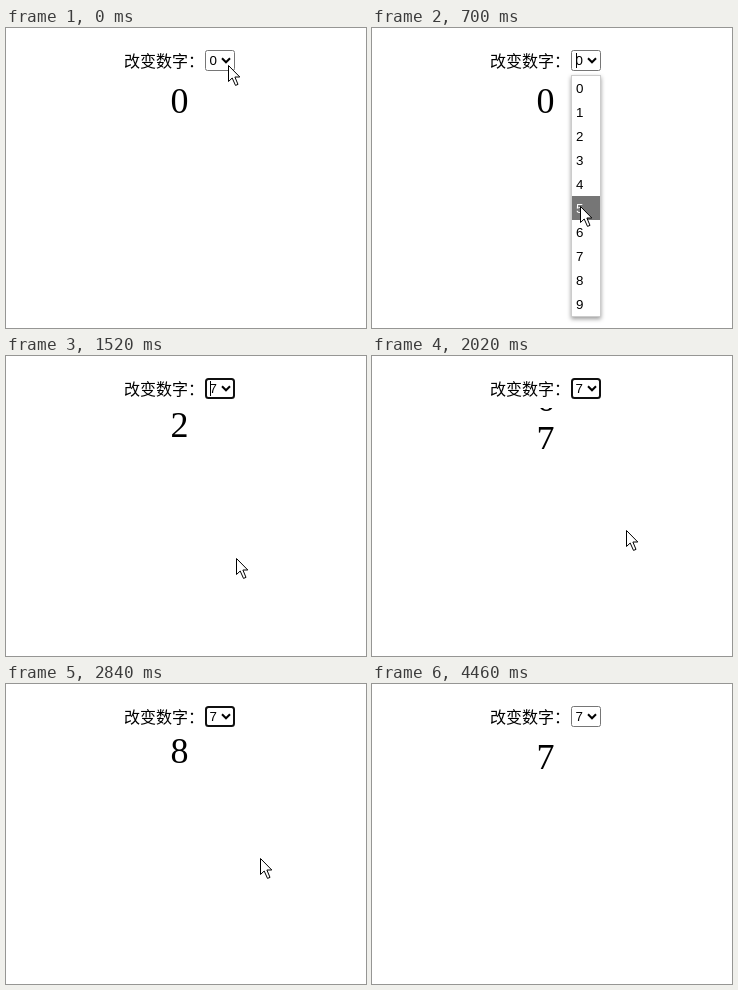
Animation of 360x300 px, one loop 4660 ms. Source, as an HTML page:

```html
<!DOCTYPE html>
<html lang="zh-CN">
<head>
<meta charset="utf-8">
<style>
  html, body { margin: 0; width: 100%; height: 100%; overflow: hidden; background: #fff; }
  svg { display: block; }
  .label { font: 16px "Noto Sans CJK SC", "Noto Sans CJK", sans-serif; }
  .ui { font: 13.33px "Liberation Sans", Arial, sans-serif; }
  .digit { font: 36px "Liberation Serif", "Times New Roman", serif; }
</style>
</head>
<body>
<svg width="360" height="300" viewBox="0 0 360 300">
  <defs>
    <clipPath id="slot"><rect x="160" y="52" width="30" height="41"/></clipPath>
    <filter id="shadow" x="-50%" width="200%" y="-10%" height="120%">
      <feDropShadow dx="0" dy="2" stdDeviation="2.2" flood-opacity=".4"/>
    </filter>
  </defs>
  <text class="label" x="118" y="39">改变数字：</text>
  <g clip-path="url(#slot)"><g id="column" class="digit"></g></g>

  <rect id="border" x="199.5" y="22.5" width="29" height="20" rx="2" fill="#fff" stroke="#767676"/>
  <rect id="ring" x="200" y="23" width="28" height="19" rx="2.5" fill="#fff" stroke="#101010" stroke-width="2"/>
  <text id="value" class="ui" x="203.5" y="37"></text>
  <path d="M216 30.3l4 4 4-4" fill="none" stroke="#000" stroke-width="2"/>
  <path id="caret" d="M204.5 25v15" stroke="#000"/>

  <g id="menu" class="ui">
    <rect x="199" y="47" width="30" height="242" fill="#fff" filter="url(#shadow)"/>
    <rect x="199.5" y="47.5" width="29" height="241" fill="#fff" stroke="#ccc"/>
    <rect id="mark" x="200" width="28" height="24" fill="#767676"/>
    <g id="options"></g>
  </g>
  <circle id="press" r="11" fill="#ccc" fill-opacity=".6"/>
  <path id="pointer" d="M.5 .5V16.5L4.2 13 7.5 20.4 10 19.4 6.9 12H11.8Z" fill="#fff" stroke="#000"/>
</svg>
<script>
const LOOP = 4660, PITCH = 40;
const $ = id => document.getElementById(id);
const show = (id, on) => $(id).style.display = on ? '' : 'none';
const moveTo = (id, x, y) => $(id).setAttribute('transform', `translate(${x} ${y})`);

function addText(parent, text, x, y) {
  const el = document.createElementNS('http://www.w3.org/2000/svg', 'text');
  el.textContent = text;
  el.setAttribute('x', x);
  el.setAttribute('y', y);
  $(parent).append(el);
  return el;
}

const options = [];
for (let i = 0; i < 10; i++) {
  addText('column', i, 164.5, 85 + i * PITCH);
  options.push(addText('options', i, 204, 65 + i * 24));
}

// Pointer stops: time, x, y
const path = [
  [0, 222, 37], [400, 222, 37], [500, 212, 91], [820, 206, 230], [1320, 206, 230],
  [1720, 254, 174], [2940, 254, 174], [3540, 294, 257], [3740, 309, 283], [LOOP, 309, 283]
];

function pointerAt(t) {
  const i = path.findIndex(p => p[0] > t);
  const [t0, x0, y0] = path[i - 1], [t1, x1, y1] = path[i];
  const k = (t - t0) / (t1 - t0);
  return [Math.round(x0 + (x1 - x0) * k), Math.round(y0 + (y1 - y0) * k)];
}

const bezier = (s, a, b) => 3 * s * (1 - s) ** 2 * a + 3 * s * s * (1 - s) * b + s ** 3;

// Overshooting ease, solved by bisection
function ease(x) {
  if (x <= 0) return 0;
  if (x >= 1) return 1;
  let lo = 0, hi = 1;
  for (let i = 0; i < 24; i++) {
    const mid = (lo + hi) / 2;
    if (bezier(mid, .5, .5) < x) lo = mid; else hi = mid;
  }
  return bezier(lo, 1.513, 1.33);
}

function draw(t) {
  const [x, y] = pointerAt(t);
  const open = t >= 300 && t < 1320;
  const chosen = t >= 1320;
  const focused = chosen && t < 4460;
  const blinkOn = t < 1740 || Math.floor((t - 1740) / 530) % 2 === 1;

  moveTo('column', 0, -7 * PITCH * ease((t - 1320) / 2000));
  $('value').textContent = chosen ? 7 : 0;
  show('border', !focused);
  show('ring', focused);
  show('caret', t >= 300 && t < 3860 && blinkOn);

  const active = Math.max(0, Math.floor((y - 48) / 24));
  show('menu', open);
  $('mark').setAttribute('y', 48 + active * 24);
  options.forEach((el, i) => el.setAttribute('fill', i === active ? '#fff' : '#000'));

  show('press', t >= 200 && t < 300 || t >= 1220 && t < 1320);
  moveTo('press', x + 1, y);
  show('pointer', t < 3940);
  moveTo('pointer', x, y);
}

// Screen updates ten times a second, with a slight drift
const start = performance.now();
function tick() {
  const t = (performance.now() - start) % LOOP;
  const slip = 20 * Math.floor((t + 1000) / 1750);
  draw(Math.max(0, Math.floor((t - slip) / 100) * 100 + slip));
  requestAnimationFrame(tick);
}
tick();
</script>
</body>
</html>
```
